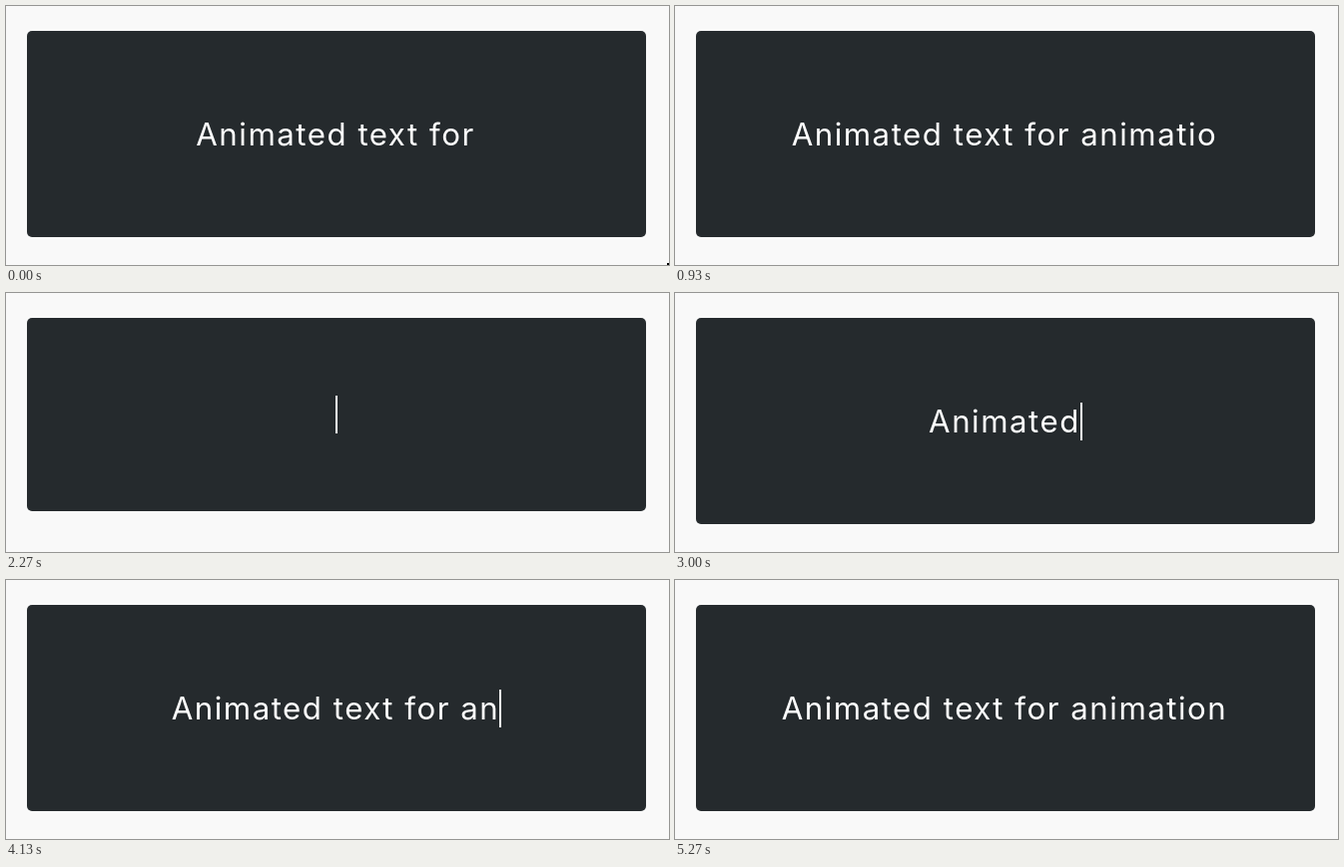
These frames come from a looping animation (664x260 px, 5670 ms). An HTML page:

```html
<!DOCTYPE html>
<html lang="en">
<head>
<meta charset="utf-8">
<title>Typed text</title>
<style>
  html, body { margin: 0; width: 100%; height: 100%; overflow: hidden; background: #f9f9f9; }
  .card {
    position: absolute; left: 21px; top: 25px; width: 620px; height: 207px;
    border-radius: 5px; background: #252a2d;
  }
  .line {
    position: absolute; left: 0; top: 85px; width: 100%;
    text-align: center; color: #fff;
    font: 400 31.25px/38px Inter, sans-serif;
    font-optical-sizing: none;
    letter-spacing: 1.5px;
  }
  .typed { border-right: 2px solid transparent; }
  .caret .typed { border-color: #fff; }
  .empty { height: 194px; }
  .empty .line { top: 78px; }
  .speck { position: absolute; left: 662px; top: 258px; width: 2px; height: 2px; background: #000; }
</style>
</head>
<body>
<div class="card"><div class="line"><span class="typed"></span></div></div>
<div class="speck"></div>
<script>
  const TEXT = "Animated text for animation";
  const LOOP = 5670;
  const TICK = 1000 / 15;
  const LAST_TICK = 84;
  const CLEAR_TICK = 34;
  const BLINK_START = 1152, BLINK_HALF = 456.5;
  // Ticks of the first 16 keystrokes; the rest follow at a steady pace.
  const EARLY_KEYS = [35, 37, 38, 40, 41, 42, 44, 45, 46, 47, 49, 50, 52, 53, 55, 56];
  const STEADY_TICK = 57, STEADY_COUNT = 17;

  const card = document.querySelector(".card");
  const typed = document.querySelector(".typed");
  const speck = document.querySelector(".speck");

  const steadyCount = ticks => Math.min(TEXT.length, STEADY_COUNT + Math.floor(ticks / 1.5));

  function typedCount(tick) {
    if (tick < CLEAR_TICK) return steadyCount(tick);
    if (tick >= STEADY_TICK) return steadyCount(tick - STEADY_TICK);
    return EARLY_KEYS.filter(key => key <= tick).length;
  }

  // Ticks begin on times rounded to 10 ms.
  function tickAt(ms) {
    const startOf = tick => Math.round(tick * TICK / 10) * 10;
    const tick = Math.floor(ms / TICK);
    if (startOf(tick + 1) <= ms) return tick + 1;
    return startOf(tick) > ms ? tick - 1 : tick;
  }

  let shown = -1;
  function draw(now) {
    const tick = Math.min(LAST_TICK, tickAt(now % LOOP));
    if (tick === shown) return;
    shown = tick;
    const count = typedCount(tick);
    const phase = Math.floor((tick * TICK - BLINK_START) / BLINK_HALF);
    typed.textContent = TEXT.slice(0, count);
    card.classList.toggle("empty", count === 0);
    card.classList.toggle("caret", phase % 2 === 0);
    speck.hidden = tick > 0;
  }

  const start = performance.now();
  function loop() {
    draw(performance.now() - start);
    requestAnimationFrame(loop);
  }
  loop();
</script>
</body>
</html>
```
